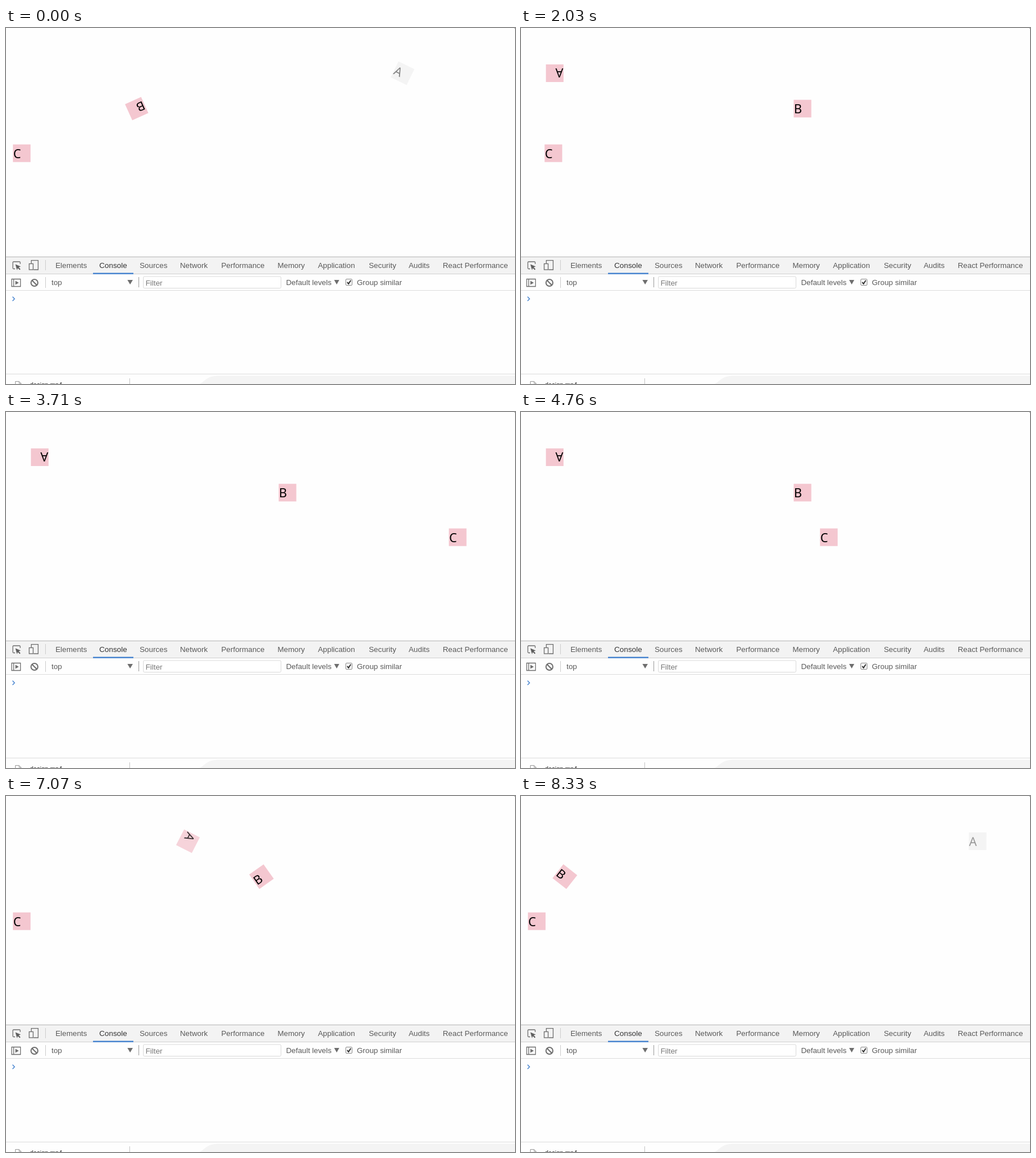
An HTML page that plays this animation: 895x626 px, repeating every 8.4 s.

```html
<!DOCTYPE html>
<html lang="en">
<head>
<meta charset="utf-8">
<title>Sliding boxes</title>
<style>
  html, body { margin: 0; width: 100%; height: 100%; overflow: hidden; background: #fefefe; }
  svg { display: block; }
  .ui { font: 13.3px "Liberation Sans", Arial, sans-serif; fill: #5a5a5a; }
  .letter { font: 21.5px "Noto Sans", "Open Sans", sans-serif; }
  .line { fill: none; stroke: #6e6e6e; stroke-width: 1.3; }
</style>
</head>
<body>
<svg width="895" height="626" viewBox="0 0 895 626">
  <rect width="895" height="626" fill="#fefefe"/>
  <rect x="894" width="1" height="1" fill="#888"/>
  <g id="boxes"></g>

  <g id="panel">
    <rect y="403" width="895" height="29" fill="#f3f3f3"/>
    <path d="M0 402.5H895" stroke="#b4b4b4"/>
    <path d="M0 432.5H895" stroke="#cfcfcf"/>
    <path d="M0 461.5H895M0 608.5H895" stroke="#dcdcdc"/>
    <path d="M69.5 408V426M69.5 438V457" stroke="#cccccc"/>
    <path d="M233.5 438V456" stroke="#9a9a9a"/>
    <rect x="153" y="430.5" width="71" height="2.5" fill="#4a86d0"/>

    <path class="line" d="M16 423.5H13.5Q12 423.5 12 422V412.500Q12 411 13.500 411H23.500Q25 411 25 412.500V415"/>
    <path d="M16.500 415.500L26 419.500L22.300 420.800L25.500 424L24 425.500L20.800 422.300L19.300 425.800Z" fill="#5f5f5f"/>
    <path class="line" d="M44.500 414V408.700H56.500V425H48.500"/>
    <rect class="line" x="40.700" y="414.500" width="7" height="10.500"/>

    <path class="line" d="M10 441.500H25.500V454.500H10ZM13.500 441.500V454.500"/>
    <path d="M16.500 444.500L22.500 448L16.500 451.500Z" fill="#6e6e6e"/>
    <g class="line" style="stroke-width:2">
      <circle cx="50" cy="448" r="6"/>
      <path d="M45.800 443.800L54.200 452.200"/>
    </g>

    <path d="M213.500 443H223L218.250 451ZM577 443H586L581.500 451Z" fill="#6e6e6e"/>
    <rect x="241.500" y="437" width="242" height="20.500" rx="2" fill="#fff" stroke="#d9d9d9"/>
    <rect x="597.500" y="441.500" width="11" height="11" rx="1.500" fill="#fafafa" stroke="#8a8a8a"/>
    <path d="M600 447L602.300 449.800L606.300 443.700" fill="none" stroke="#333" stroke-width="2"/>
    <path d="M11.500 472.500L15 476.200L11.500 480" fill="none" stroke="#4a86d0" stroke-width="1.500"/>

    <path d="M340 626C350 622 352 611.500 374 611.500H895V626Z" fill="#f4f4f4"/>
    <path d="M217.500 616V626" stroke="#c4c4c4"/>
    <path d="M16.500 626V621.500H23L26.500 625V626M23 621.500V625H26.500" fill="none" stroke="#999"/>
    <text class="ui" x="42" y="630.500" style="font-size:11px;fill:#222">design.mp4</text>
  </g>
</svg>
<script>
const NS = "http://www.w3.org/2000/svg";
const LOOP = 8400, STEP = 70, TURN = 3880;
const PINK = "#f4c7d0", PALE = "#f4f4f4";

function add(parent, tag, attrs, text) {
  const node = document.createElementNS(NS, tag);
  for (const key in attrs) node.setAttribute(key, attrs[key]);
  if (text) node.textContent = text;
  parent.appendChild(node);
  return node;
}

const panel = document.getElementById("panel");
const label = (x, y, text, fill) =>
  add(panel, "text", { class: "ui", x, y, style: fill ? "fill:" + fill : "" }, text);

[[87, "Elements"], [164, "Console", "#333"], [235, "Sources"], [306, "Network"],
 [378.5, "Performance"], [477.5, "Memory"], [548.5, "Application"], [638, "Security"],
 [708, "Audits"], [768, "React Performance"]
].forEach(([x, text, fill]) => label(x, 421.5, text, fill));
label(80, 452, "top");
label(245.5, 452.7, "Filter", "#777");
label(492.5, 452, "Default levels");
label(617, 452, "Group similar");

// Centre positions; start and span are in ms on the forward timeline.
const boxes = [
  { name: "A", y: 79.5, from: 804.5, to: 59.3, turn: 180, start: -590, span: 2200, fade: true },
  { name: "B", y: 141.8, from: 27.7, to: 495, turn: 360, start: -1023, span: 2200 },
  { name: "C", y: 220.2, from: 27.7, to: 804.5, turn: 0, start: 1735, span: 2150 }
];

for (const box of boxes) {
  box.group = add(document.getElementById("boxes"), "g", {});
  box.rect = add(box.group, "rect", { x: -15.5, y: -15.5, width: 31, height: 31, fill: PINK });
  box.text = add(box.group, "text", { class: "letter", x: -15, y: 8.3 }, box.name);
}

const clamp = u => Math.min(1, Math.max(0, u));
const easeInOut = u => u < 0.5 ? 2 * u * u : 1 - 2 * (1 - u) ** 2;

// Forward, then back, with the last stretch running slightly slower.
function timelineAt(ms) {
  if (ms < TURN) return ms;
  if (ms < 7070) return 2 * TURN - ms;
  return 690 - (ms - 7070) * 0.958;
}

function render(ms) {
  const t = timelineAt(ms);
  for (const box of boxes) {
    const p = easeInOut(clamp((t - box.start) / box.span));
    const x = box.from + (box.to - box.from) * p;
    box.group.setAttribute("transform",
      `translate(${x.toFixed(2)} ${box.y}) rotate(${(box.turn * p).toFixed(2)})`);
    if (box.fade) {
      const alpha = 0.37 + 0.63 * p;
      const pale = p < 0.25;
      box.rect.setAttribute("fill", pale ? PALE : PINK);
      box.rect.setAttribute("opacity", pale ? 1 : alpha);
      box.text.setAttribute("opacity", alpha);
    }
  }
}

const begin = performance.now();
function tick() {
  const ms = (performance.now() - begin) % LOOP;
  render(Math.floor(ms / STEP) * STEP);
  requestAnimationFrame(tick);
}
render(0);
requestAnimationFrame(tick);
</script>
</body>
</html>
```
